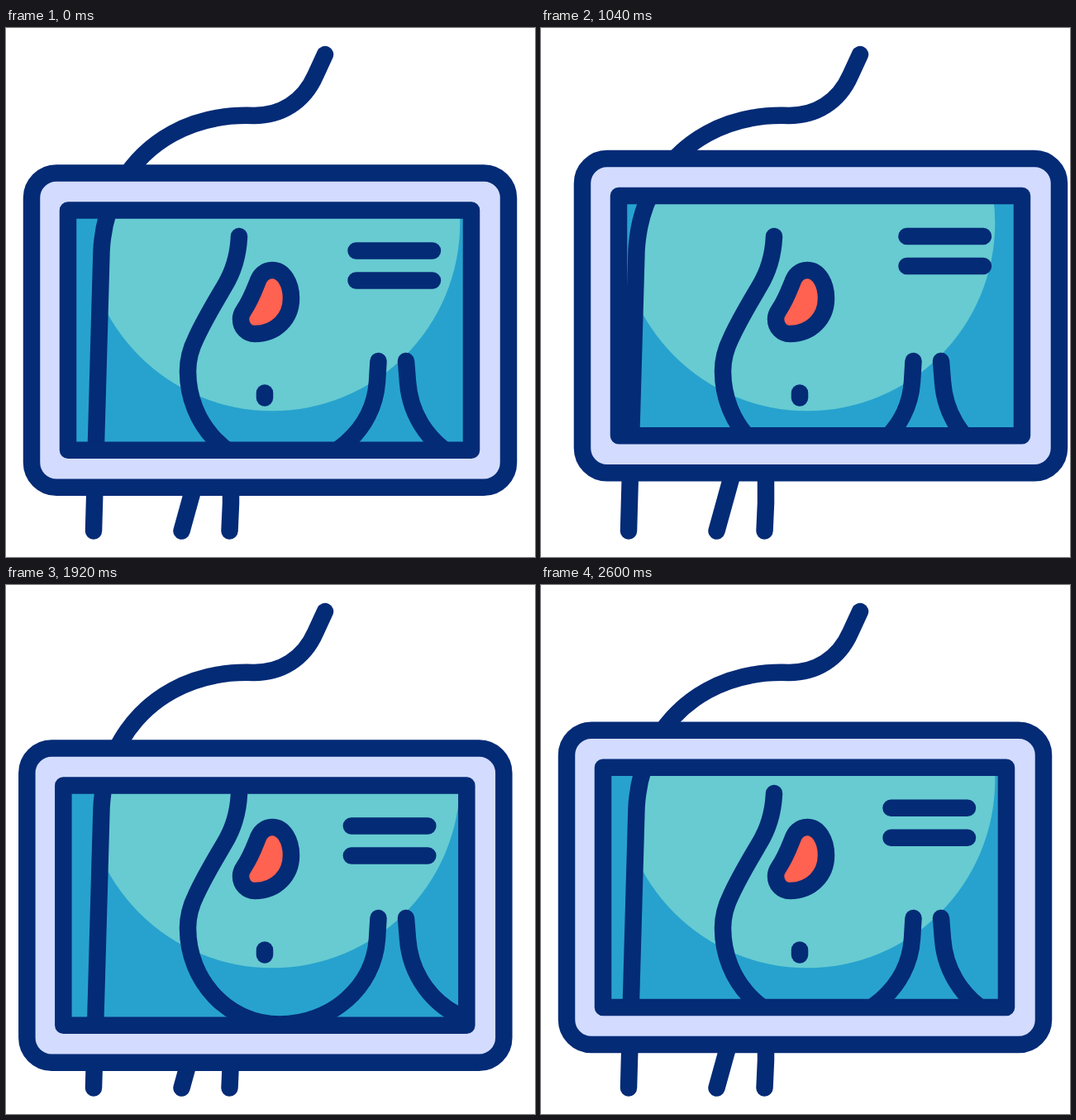
Animation, 640 px wide and 640 px high, one loop 2.64 s. Source, as an HTML page:

```html
<!DOCTYPE html>
<html lang="en">
<head>
<meta charset="utf-8">
<title>Body scan</title>
<style>
  html, body { margin: 0; width: 100%; height: 100%; overflow: hidden; background: #fff; }
  svg { display: block; width: 100vw; height: 100vh; }
  .line { fill: none; stroke: #042b76; stroke-width: 20.5; stroke-linecap: round; stroke-linejoin: round; }
  .red { fill: none; stroke: #ff6250; stroke-width: 23.4; stroke-linecap: round; }
</style>
</head>
<body>
<svg viewBox="0 0 640 640">
  <defs>
    <path id="back" d="M386 32 L374.5 57 C360 90 332 106 300 106 C222 103 168 140 140 187 C124 213 117 240 115.5 270 L106 608.5"/>
    <clipPath id="window"><rect class="moving" x="80" y="225" width="478" height="281"/></clipPath>
  </defs>

  <!-- body outside the monitor -->
  <g class="line">
    <use href="#back"/>
    <path d="M212.5 608.5 L232 538 M270.5 608.5 L272 575 V538"/>
  </g>

  <g class="moving">
    <rect x="31" y="175.5" width="577" height="380.3" rx="30" fill="#d3dcff"/>
    <rect x="75" y="220.5" width="488" height="290.3" fill="#27a2ce"/>
  </g>

  <!-- body seen through the screen -->
  <g clip-path="url(#window)">
    <circle cx="322" cy="236" r="227.3" fill="#67cbd1"/>
    <path d="M140 187 C124 213 117 240 115.5 270 L106 608 H0 V187 Z" fill="#27a2ce"/>
    <g class="line">
      <use href="#back"/>
      <path d="M282 252 C281 277 275 295 264 313 C251 335 240 353 230 375 C222 391 220 403 220 415 C220 479 269 531.5 331 531.5 C393 531.5 445 487 449 428 L450.5 403"/>
      <path d="M484 403 L486 428 C489 470 515 510 560 526"/>
      <path d="M313 441.5 V447.5"/>
      <path fill="#ff6250" d="M304 308 C307 299 313 293 322 293 C336 293 345 309 345 327 C345 351 327 370 301 370 C292 370 284 363 284 352 C284 348 286 344 288 341 C296 329 300 318 304 308 Z"/>
    </g>
  </g>

  <g class="moving">
    <g class="line">
      <rect x="31" y="175.5" width="577" height="380.3" rx="30"/>
      <rect x="75" y="220.5" width="488" height="290.3"/>
      <path d="M423.5 269.5 h92.5 m-92.5 36 h92.5"/>
    </g>
    <path class="red"/>
    <path class="red"/>
  </g>
</svg>
<script>
  const LOOP = 2640;
  // key points of the monitor's closed drift, each with its bezier handle
  const keys = [
    { x: 0, y: 0, hx: 0, hy: -3 },
    { x: 0.6, y: -19.3, hx: 4.4, hy: -4.8 },
    { x: 19, y: -17.5, hx: 3.2, hy: 9 },
    { x: 15.6, y: 20.2, hx: -7.8, hy: 9.5 },
    { x: -12, y: 17.5, hx: -4.3, hy: -5 }
  ];
  const LEG = LOOP / keys.length;
  // a red dash runs along each bar: its tail follows its head after a delay
  const bar = { x: 423.5, y: 269.5, width: 92.5, step: 36 };
  const dash = { time: 470, tail: 168, next: 233 };

  const moving = document.querySelectorAll('.moving');
  const reds = document.querySelectorAll('.red');

  const ease = u => {
    u = Math.min(1, Math.max(0, u));
    return u * u * (3 - 2 * u);
  };

  const bezier = (a, b, c, d, s, r = 1 - s) =>
    r * r * r * a + 3 * r * r * s * b + 3 * r * s * s * c + s * s * s * d;

  function driftAt(t) {
    const i = Math.floor(t / LEG) % keys.length;
    const p = keys[i], q = keys[(i + 1) % keys.length];
    const s = ease(t / LEG - i);
    return [
      bezier(p.x, p.x + p.hx, q.x - q.hx, q.x, s),
      bezier(p.y, p.y + p.hy, q.y - q.hy, q.y, s)
    ];
  }

  function drawDash(el, row, t) {
    const along = delay => ease((t - row * dash.next - delay) / dash.time);
    const head = along(0), tail = along(dash.tail);
    const at = u => bar.x + bar.width * u;
    el.setAttribute('d', head - tail > 0.001
      ? `M${at(tail)} ${bar.y + row * bar.step} H${at(head)}` : '');
  }

  function draw(t) {
    const shift = `translate(${driftAt(t).join(' ')})`;
    moving.forEach(el => el.setAttribute('transform', shift));
    reds.forEach((el, row) => drawDash(el, row, t));
  }

  function tick() {
    draw(performance.now() % LOOP);
    requestAnimationFrame(tick);
  }
  tick();
</script>
</body>
</html>
```
